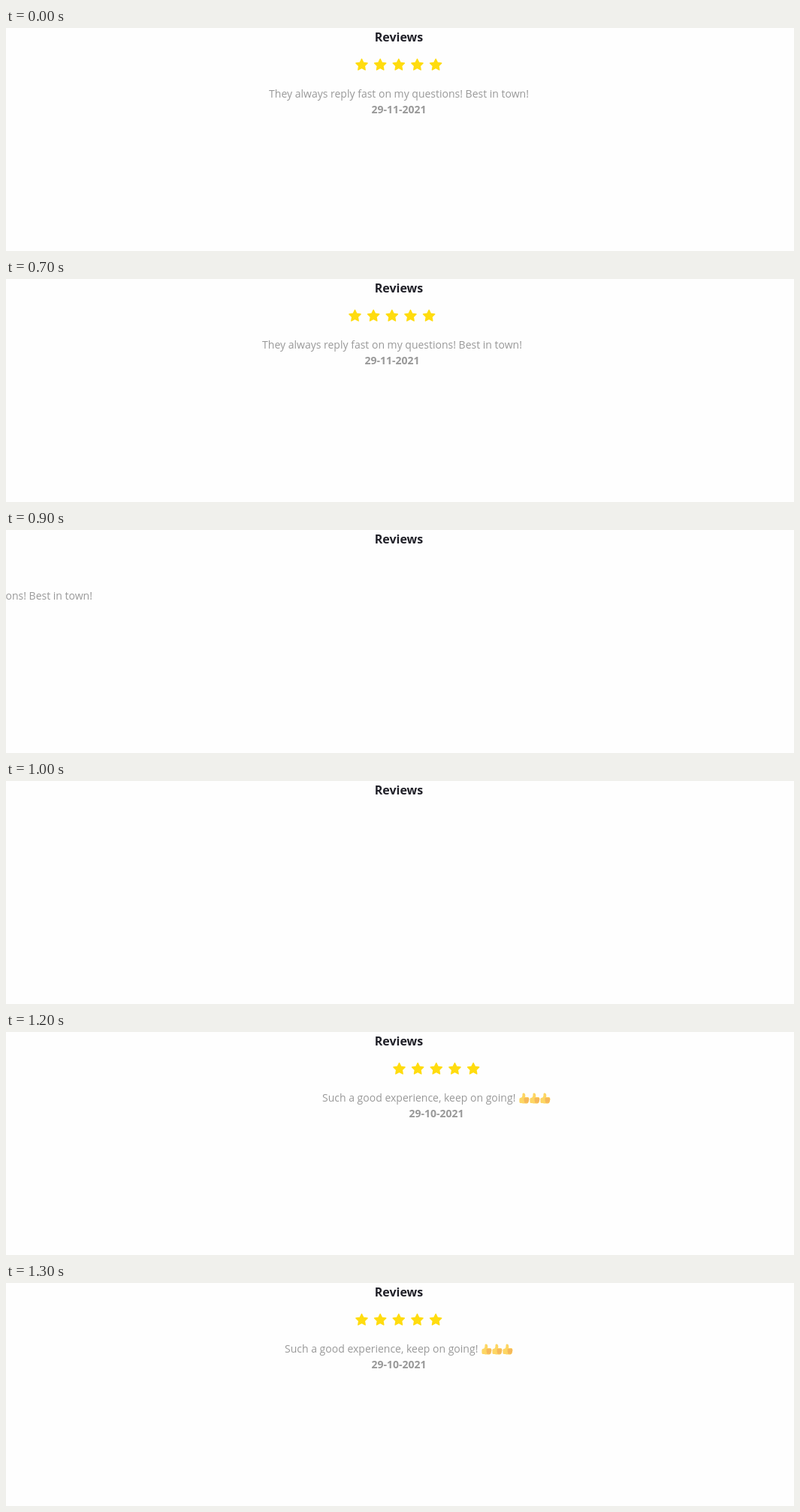
These frames come from a looping animation (1049x298 px, 8 s). An HTML page:

```html
<!DOCTYPE html>
<html lang="en">
<head>
<meta charset="utf-8">
<title>Reviews</title>
<style>
  html, body { margin: 0; width: 100%; height: 100%; overflow: hidden; background: #fefefe; }
  svg { display: block; }
  text { font: 14px "Open Sans", sans-serif; fill: #999; }
  .title { font-size: 16px; font-weight: 700; fill: #212129; }
  .date { font-weight: 700; }
  .mid { text-anchor: middle; }
  .star { fill: #ffdc0f; stroke: #ffdc0f; stroke-width: 1.4; stroke-linejoin: round; }
</style>
</head>
<body>
<svg width="1049" height="298" viewBox="0 0 1049 298">
  <defs>
    <polygon id="star" class="star"/>
    <g id="thumb">
      <path d="M0.4 8.8Q0.4 7.2 1.9 7L3.4 6.5Q4.7 5 4.5 2.4Q4.4 0.5 5.9 0.5Q7.7 0.6 8.2 2.8Q8.5 4.6 8 6L11.8 6.1Q13.5 6.5 13.2 8.1Q13.8 9.3 13.1 10.3Q13.4 11.6 12.5 12.4Q12.5 14.3 10.3 14.5L5.4 14.5Q4.2 14.1 3.2 13.9L1.4 13.9Q0.4 13.6 0.4 12Z" fill="#fdd663"/>
      <path d="M7.4 6.4H11.6Q13.2 6.7 13 8.1Q13.6 9.2 12.9 10.3Q13.1 11.5 12.3 12.3Q12.3 14.1 10.4 14.2H8Q7 13.6 7.4 12.4Q6.5 11.5 6.9 10.3Q6.2 9.2 6.7 8.2Q6.4 7 7.4 6.4Z" fill="#fbc65f"/>
      <path d="M7 8.4H12.7M7 10.4H12.5M7.4 12.4H11.9" fill="none" stroke="#f0a555" stroke-width=".8" stroke-linecap="round"/>
    </g>
  </defs>
  <text class="title mid" x="523" y="18">Reviews</text>
  <g id="first">
    <g class="stars"></g>
    <text class="mid" x="523" y="93">They always reply fast on my questions! Best in town!</text>
    <text class="date mid" x="523" y="114">29-11-2021</text>
  </g>
  <g id="second">
    <g class="stars"></g>
    <text x="371" y="93">Such a good experience, keep on going!</text>
    <use href="#thumb" x="633" y="81"/>
    <use href="#thumb" x="647" y="81"/>
    <use href="#thumb" x="661" y="81"/>
    <text class="date mid" x="523" y="114">29-10-2021</text>
  </g>
</svg>
<script>
  const LOOP = 8000, STEP = 100;
  const START = 669.2, SLIDE = 600, WIDTH = 1890;
  const byId = id => document.getElementById(id);
  const first = byId('first'), second = byId('second');

  byId('star').setAttribute('points', Array.from({ length: 10 }, (_, i) => {
    const r = i % 2 ? 4 : 8, a = i * Math.PI / 5;
    return (r * Math.sin(a)).toFixed(2) + ',' + (-r * Math.cos(a)).toFixed(2);
  }).join(' '));

  for (const row of document.querySelectorAll('.stars')) {
    row.innerHTML = [-2, -1, 0, 1, 2]
      .map(i => `<use href="#star" x="${522.8 + i * 24.65}" y="49.5"/>`).join('');
  }

  // cubic-bezier(.42, 0, .58, 1), solved by bisection
  function easeInOut(x) {
    let lo = 0, hi = 1;
    for (let i = 0; i < 30; i++) {
      const s = (lo + hi) / 2, q = 1 - s;
      if (1.26 * s * q * q + 1.74 * s * s * q + s * s * s < x) lo = s; else hi = s;
    }
    return lo * lo * (3 - 2 * lo);
  }

  function place(el, x) {
    el.setAttribute('transform', `translate(${x} 0)`);
    el.setAttribute('visibility', Math.abs(x) < 1049 ? 'visible' : 'hidden');
  }

  function draw(ms) {
    const t = Math.floor((ms % LOOP) / STEP) * STEP;
    const u = Math.min(1, Math.max(0, (t - START) / SLIDE));
    const shift = u === 1 ? WIDTH : Math.floor(easeInOut(u) * WIDTH);
    place(first, -shift);
    place(second, WIDTH - shift);
  }

  const begin = performance.now();
  function tick() {
    draw(performance.now() - begin);
    requestAnimationFrame(tick);
  }
  draw(0);
  requestAnimationFrame(tick);
</script>
</body>
</html>
```
